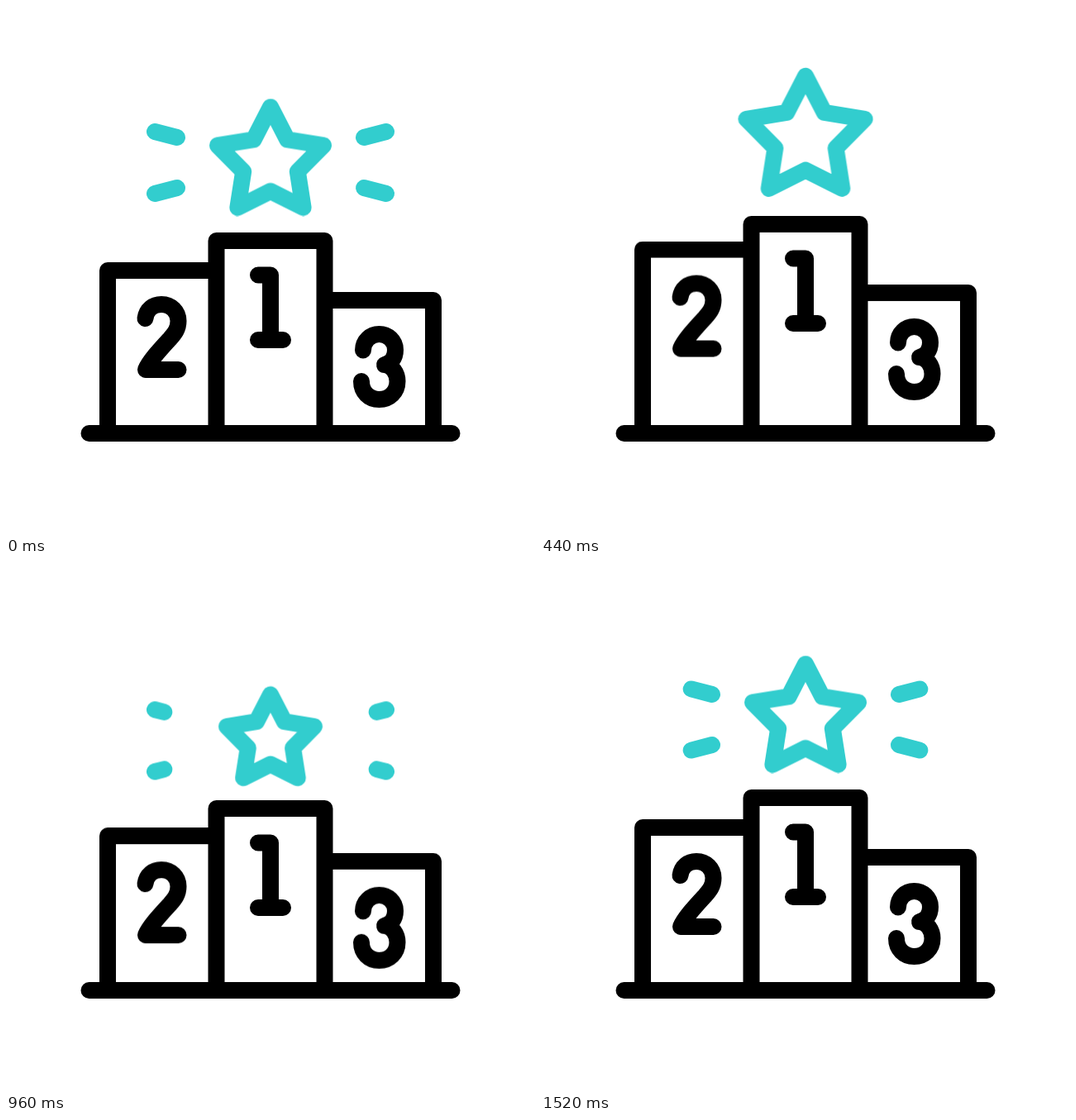
Recreate the animation shown at these times as an HTML page without scripts. Size 640x640 px, loop 1560 ms.

```html
<!DOCTYPE html>
<html lang="en">
<head>
<meta charset="utf-8">
<title>Winners' podium</title>
<style>
  html, body { margin: 0; width: 100%; height: 100%; overflow: hidden; background: #fff; }
  svg { display: block; width: 100%; height: 100%; }
  path, line { fill: none; stroke: #000; stroke-width: 20; stroke-linecap: round; stroke-linejoin: round; }
  .award path, .award line { stroke: #32cdce; }

  /* Rise, dip and settle; the steps follow each other by 120 ms */
  .bob { animation: bob 1560ms cubic-bezier(.333, 0, .667, 1) infinite; }
  .step { --up: -25.5px; --down: 13px; }
  .first, .award, .star { animation-delay: 120ms; }
  .third { animation-delay: 240ms; }
  .award { --up: -37.5px; --down: 25.4px; }
  .star { --up: 0px; --down: 0px; --big: 1.15; --small: .828; vector-effect: non-scaling-stroke; }

  @keyframes bob {
    0%, 2.564%, 79.487%, 100% { transform: translateY(0) scale(1); }
    28.205% { transform: translateY(var(--up)) scale(var(--big, 1)); }
    53.846% { transform: translateY(var(--down)) scale(var(--small, 1)); }
  }

  /* Each ray wipes away outwards, then grows again from its inner end */
  .rays line {
    stroke-dasharray: 1 2;
    animation: wipe 1560ms cubic-bezier(.333, 0, .667, 1) infinite;
  }
  @keyframes wipe {
    0% { stroke-dashoffset: 0; }
    16.667% { stroke-dashoffset: -1.01; }
    32.692% { stroke-dashoffset: -1.99; }
    53.846% { stroke-dashoffset: -3; }
    67.949% { stroke-dashoffset: -4.01; }
    83.333% { stroke-dashoffset: -4.99; }
    100% { stroke-dashoffset: -6; }
  }
</style>
</head>
<body>
<svg viewBox="0 0 640 640">
  <defs>
    <clipPath id="above-floor"><rect width="640" height="517"/></clipPath>
  </defs>

  <g clip-path="url(#above-floor)">
    <g class="bob step second">
      <path d="M123 570V320H254"/>
      <path d="M168.5 378C170 367 178 361 188 361C200 361 208.5 370 208.5 381C208.5 391 204 396 198 403C186 416 173 430 169 440H208.5"/>
    </g>
    <g class="bob step third">
      <path d="M386 356H517V570"/>
      <path d="M432 416.5C432 405 441 397 451.5 397C462 397 471 405 471 416C471 426 466 432 458 434C467 434.5 473.5 444 473.5 454C473.5 467 464 476 451.5 476C439 476 430 467 430 454"/>
    </g>
    <g class="bob step first">
      <path d="M254.5 570V284H385.5V570"/>
      <path d="M305 325.5H320V404M305 404H335"/>
    </g>
  </g>
  <path d="M100.5 517H539.5"/>

  <g class="bob award">
    <g class="rays">
      <line pathLength="1" x1="207" y1="159" x2="180" y2="152"/>
      <line pathLength="1" x1="207" y1="220" x2="180" y2="227"/>
      <line pathLength="1" x1="433" y1="159" x2="460" y2="152"/>
      <line pathLength="1" x1="433" y1="220" x2="460" y2="227"/>
    </g>
    <g transform="translate(320 189.5)">
      <path class="bob star" d="M0-67.3L20.3-27.9L64-20.8L32.8 10.7L39.6 54.4L0 34.5L-39.6 54.4L-32.8 10.7L-64-20.8L-20.3-27.9Z"/>
    </g>
  </g>
</svg>
</body>
</html>
```
